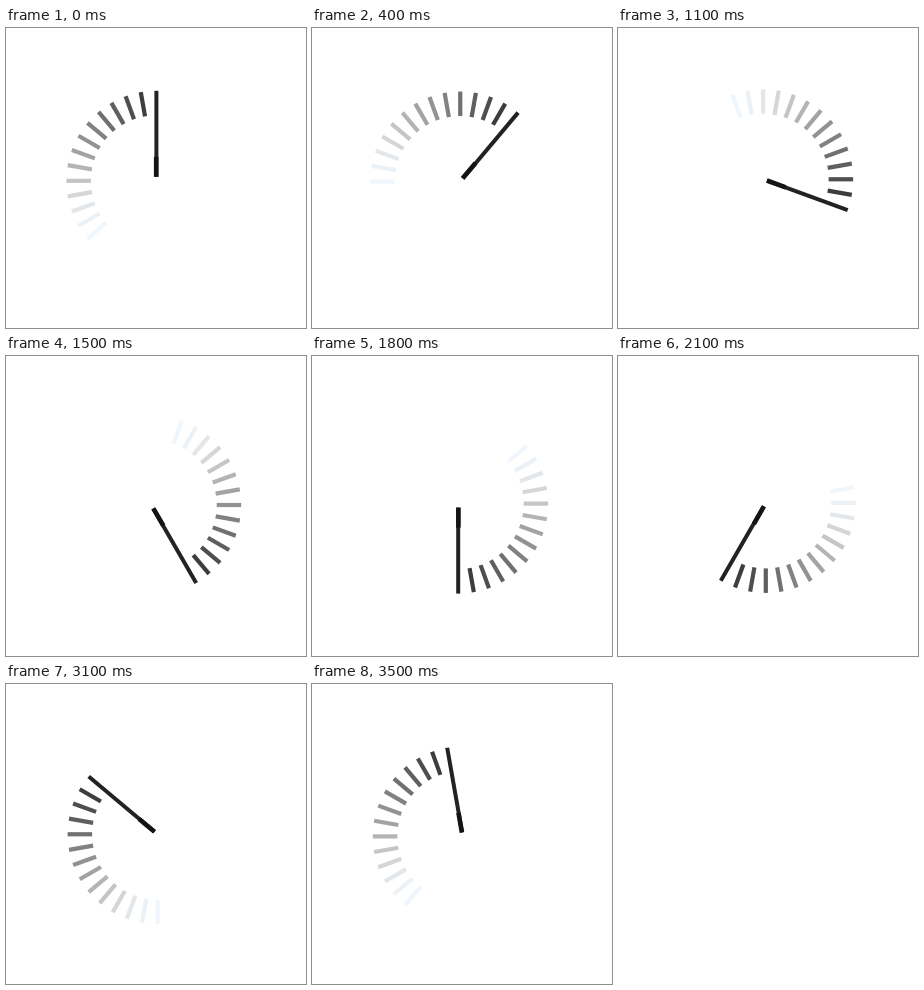
Write an HTML page that moves like this. It is 300x300 px and loops after 3600 ms.

```html
<!DOCTYPE html>
<html lang="en">
<head>
<meta charset="utf-8">
<title>Sweeping dial</title>
<style>
  html, body { margin: 0; width: 100%; height: 100%; overflow: hidden; background: #fff; }
  svg { display: block; width: 100vw; height: 100vh; }
</style>
</head>
<body>
<svg viewBox="0 0 300 300"><g id="dial"></g></svg>
<script>
  const STEP_MS = 100, STEPS = 36, STEP_DEG = 10, TICKS = 13;
  const PIVOT = { x: 148.3, y: 150.2 };
  const HUB = { x: 150.4, y: 152.8 }; // slightly off the pivot, so the ring wobbles
  const OUTER = 90, INNER = 65.5;
  const dial = document.getElementById('dial');

  function addBar(angle, from, to, width, color, shift = 0) {
    const bar = document.createElementNS('http://www.w3.org/2000/svg', 'rect');
    const attributes = {
      x: HUB.x - width / 2 + shift, y: HUB.y - to,
      width, height: to - from, fill: color,
      transform: `rotate(${angle} ${HUB.x} ${HUB.y})`
    };
    for (const name in attributes) bar.setAttribute(name, attributes[name]);
    dial.append(bar);
  }

  // Dark grey fading to a faint blue-white along the trail
  function trailColor(k) {
    const v = Math.min(44 + 17 * k, 176 + 5.4 * k);
    const tint = Math.max(0, k - 9) * 1.6;
    return `rgb(${v - tint}, ${v}, ${Math.min(255, v + tint)})`;
  }

  for (let k = TICKS; k > 0; k--) {
    addBar(-k * STEP_DEG, INNER, OUTER, 4.2, trailColor(k));
  }
  addBar(0, 4, OUTER, 4, '#222');
  addBar(0, 4, 24, 4.6, '#141414', -0.2);

  function render(now) {
    const step = Math.floor(now / STEP_MS) % STEPS;
    dial.setAttribute('transform', `rotate(${step * STEP_DEG} ${PIVOT.x} ${PIVOT.y})`);
  }

  let start;
  function tick(now) {
    start ??= now;
    render(now - start);
    requestAnimationFrame(tick);
  }
  render(0);
  requestAnimationFrame(tick);
</script>
</body>
</html>
```
